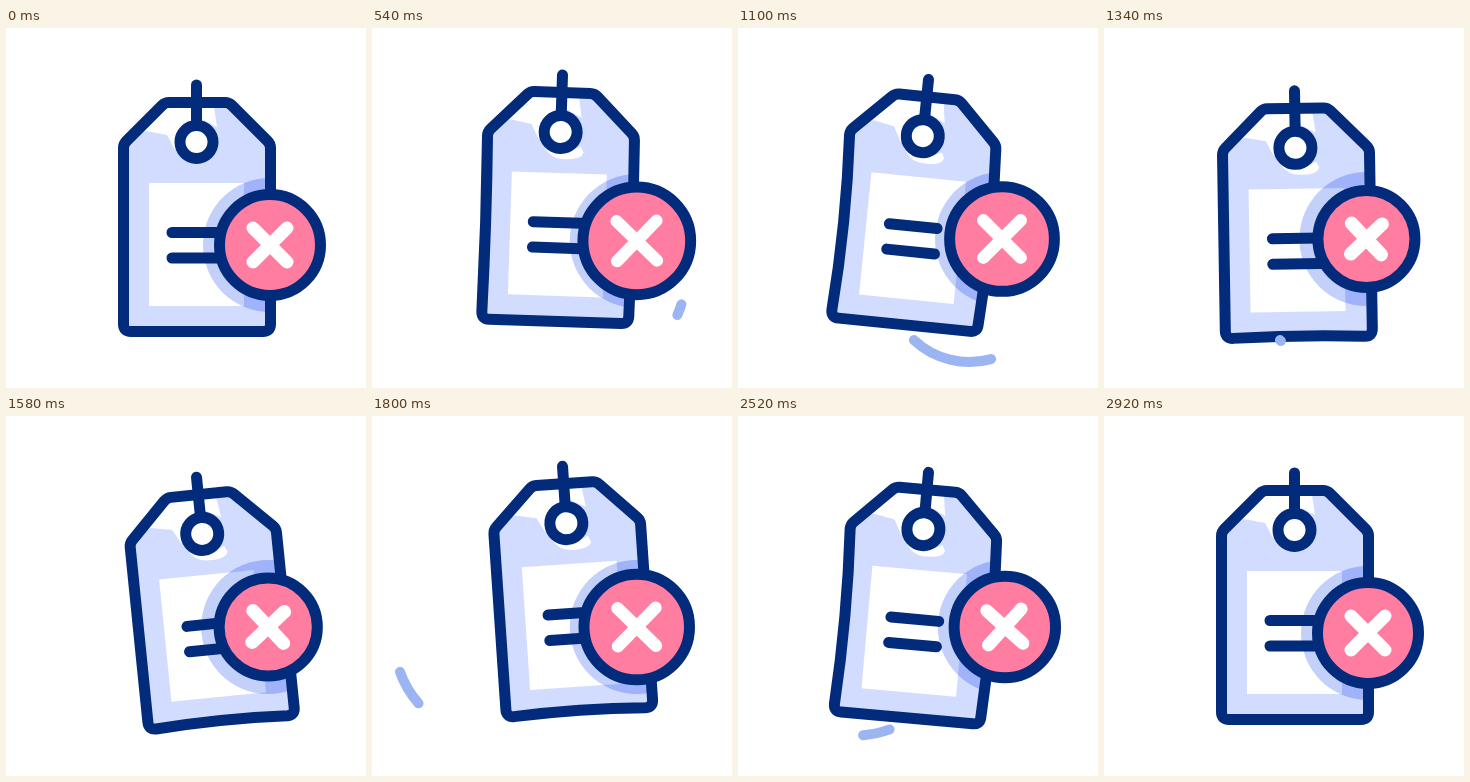
Write an HTML page with a canvas that moves like this. It is 360x360 px and loops after 3400 ms.

```html
<!DOCTYPE html>
<html>
<head>
<meta charset="utf-8">
<title>Tag removal</title>
<style>
html, body { margin: 0; width: 100%; height: 100%; overflow: hidden; background: #fff; }
canvas { display: block; width: 360px; height: 360px; }
</style>
</head>
<body>
<canvas id="stage" width="360" height="360"></canvas>
<script>
const ctx = document.getElementById('stage').getContext('2d');
const NAVY = '#032b7b', LIGHT = '#d2dcff', SHADE = '#c3d0fa', PINK = '#ff7da0', SWOOSH = '#9bb5f3';
const LOOP = 3400, RAD = Math.PI / 180;

// Turning points [time, value]; the motion eases in and out between them
const swing = [[360, 0], [920, 7.8], [1640, -6], [2270, 7.8], [2900, 0]];
const bounce = [[200, 0], [800, -16.5], [1430, 7], [2100, -16.5], [2740, 5], [2900, 0]];
const drift = [[200, 0], [800, 1.3], [1500, -2], [2200, 5], [2900, 0]];

const clamp = v => Math.min(1, Math.max(0, v));
const progress = (t, from, to) => clamp((t - from) / (to - from));
const smooth = u => (1 - Math.cos(Math.PI * u)) / 2;

// Each step adds its own eased share, so the sum passes through every point
const follow = (points, t) => points.slice(1).reduce((sum, [time, value], i) =>
  sum + (value - points[i][1]) * smooth(progress(t, points[i][0], time)), points[0][1]);

function stroke(path, color = NAVY, width = 11) {
  ctx.strokeStyle = color;
  ctx.lineWidth = width;
  ctx.stroke(path);
}

function fill(path, color) {
  ctx.fillStyle = color;
  ctx.fill(path);
}

function disc(x, y, r) {
  const p = new Path2D();
  p.arc(x, y, r, 0, 2 * Math.PI);
  return p;
}

// Tag outline; bend bows the sides, arch lifts the middle of the lower edge
const tagPath = (bend, arch) => new Path2D(
  `M163 74.5H219Q223 74.5 226 77.5L261.5 113Q264.5 116 264.5 120
   Q${264.5 + bend} 208 264.5 296Q264.5 303.5 257 303.5
   Q191 ${303.5 - arch} 125 303.5Q117.5 303.5 117.5 296
   Q${117.5 + bend} 208 117.5 120Q117.5 116 120.5 113L156 77.5Q159 74.5 163 74.5Z`);

const shine = new Path2D('M135 105L160 79H187V92L172 110L169 122L161 107L140 103ZM195 79H208L211 99L195 91Z');
const lowerShine = new Path2D('M174 128Q190 141 211 128L214 134Q212 141 197 141Q181 142 174 128Z');
const panel = new Path2D('M143 155H238V278H143Z');
const rules = new Path2D('M166 204.5H214M166 230H214');
const hook = new Path2D('M190.5 57V97');
const hole = disc(190.5, 114, 16.5);

function drawTag(angle, rise, badgeX, badgeY, moving) {
  ctx.save();
  ctx.translate(190.5, 57 + rise);
  ctx.rotate(angle * RAD);
  ctx.translate(-190.5, -57);
  const body = tagPath(Math.max(0, angle), Math.min(4, Math.max(0, -3 * angle)));
  fill(body, LIGHT);
  fill(shine, '#fff');
  if (moving) fill(lowerShine, '#fff');
  fill(panel, '#fff');

  // Badge shadow falls on the tag only
  ctx.save();
  ctx.clip(body);
  ctx.resetTransform();
  ctx.globalCompositeOperation = 'multiply';
  fill(disc(badgeX, badgeY, 67), SHADE);
  ctx.restore();

  stroke(body);
  stroke(rules);
  fill(hole, '#fff');
  stroke(hole);
  stroke(hook);
  ctx.restore();
}

function drawBadge(x, y, scale, half, angle) {
  const face = disc(x, y, 56 * scale - 5.5);
  fill(face, PINK);
  stroke(face);
  ctx.save();
  ctx.translate(x, y);
  ctx.rotate(angle * RAD);
  stroke(new Path2D(`M${-half} ${-half}L${half} ${half}M${half} ${-half}L${-half} ${half}`),
    '#fff', 13 - (half - 17) * 0.3);
  ctx.restore();
}

// Part of a circular sweep between two fractions of its angle range
function drawSwoosh(x, y, r, start, end, tail, head) {
  if (head <= 0 || tail >= 1) return;
  const at = f => (start + (end - start) * f) * RAD;
  const p = new Path2D();
  p.arc(x, y, r, at(tail), at(head), end < start);
  stroke(p, SWOOSH, 10);
}

function draw(t) {
  const angle = follow(swing, t), rise = follow(bounce, t), shift = follow(drift, t);
  const lift = smooth(progress(t, 200, 750)) - smooth(progress(t, 2650, 2900));
  const x = 264 + shift, y = 217 - 6 * lift;
  ctx.clearRect(0, 0, 360, 360);
  ctx.lineCap = ctx.lineJoin = 'round';
  drawTag(angle, rise, x, y, lift > 0.1);
  // The badge swells as the tag goes up
  drawBadge(x, y, 1 - 0.006 * rise, 17 - 0.3 * rise, -shift);
  drawSwoosh(231.5, 252.5, 81.5, 17, 133, progress(t, 860, 1345), progress(t, 515, 890));
  drawSwoosh(118, 224, 95.5, 160.5, 69.4, progress(t, 2160, 2600), progress(t, 1680, 2180));
}

function frame(now) {
  draw(now % LOOP);
  requestAnimationFrame(frame);
}
requestAnimationFrame(frame);
</script>
</body>
</html>
```
